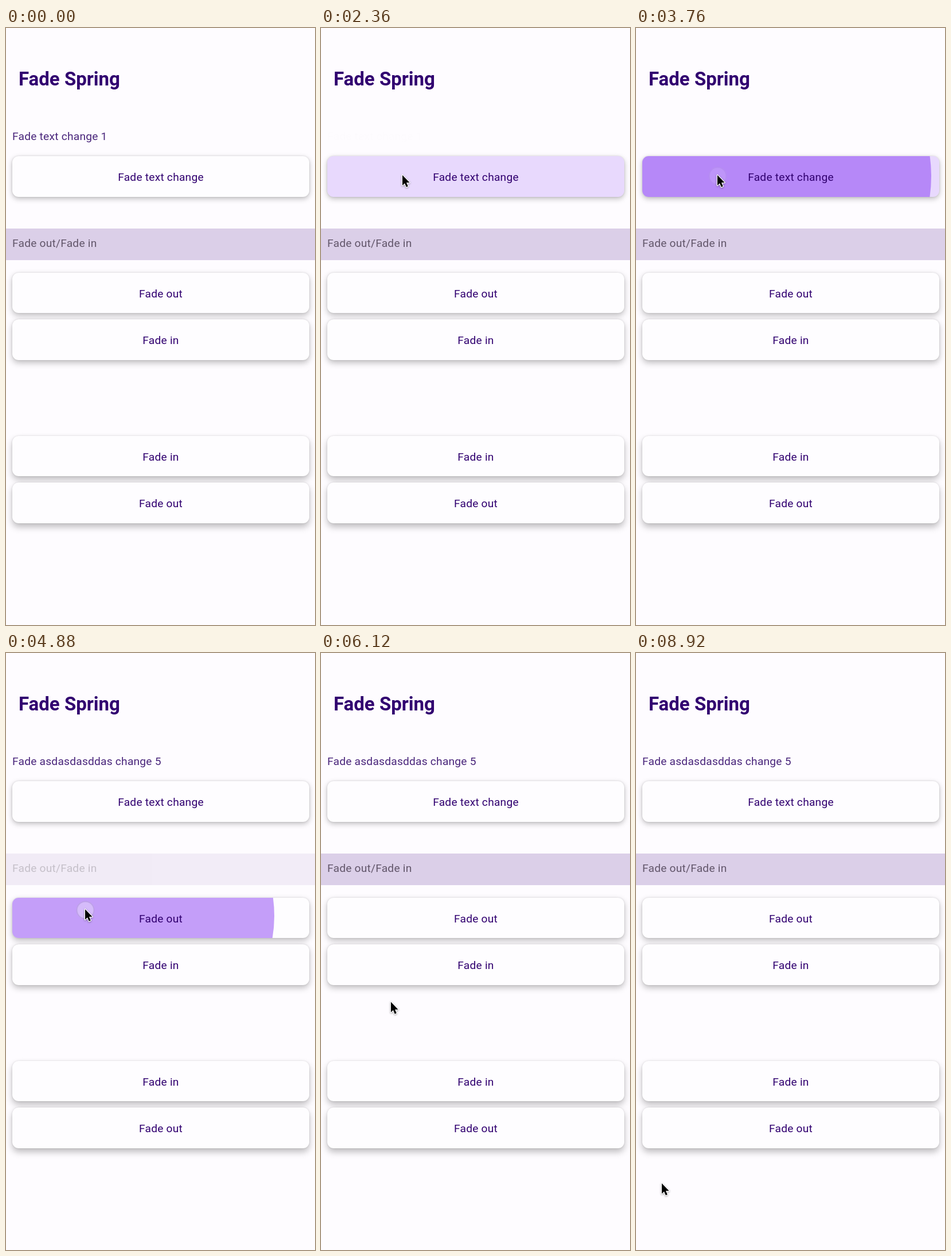
Animation of 539 by 1039 pixels, one loop 8.96 s. Source, as an HTML page:

```html
<!DOCTYPE html>
<html lang="en">
<head>
<meta charset="utf-8">
<title>Fade Spring</title>
<style>
  html, body { margin: 0; width: 100%; height: 100%; overflow: hidden; background: #fefcff; }
  body { position: relative; font: 19.2px Roboto, sans-serif; letter-spacing: .22px; white-space: nowrap; }
  body * { position: absolute; box-sizing: border-box; }
  h1 { left: 22px; top: 68px; margin: 0; font-size: 33px; line-height: 41px; font-weight: 700; letter-spacing: 0; color: #310070; }
  #label { left: 11px; top: 175px; line-height: 28px; color: #49257b; }
  .band { left: 0; width: 539px; height: 55px; padding-left: 11px; line-height: 51px; background: #dbcfe8; color: #62566a; }
  .button { left: 11px; width: 518px; height: 70.5px; border-radius: 11px; background: #fefdff; }
  .clip { inset: 0; overflow: hidden; border-radius: inherit; }
  .button span { inset: 0; line-height: 73px; text-align: center; color: #310070; }
  .ripple { border-radius: 50%; background: #6200ee; }
  #touch { width: 32px; height: 32px; border-radius: 50%; border: 2px solid rgba(110, 85, 165, .32); background: rgba(255, 255, 255, .45); }
  #cursor { left: 0; top: 0; overflow: visible; filter: drop-shadow(0 1.5px 1.5px rgba(0, 0, 0, .35)); }
</style>
</head>
<body>
<h1>Fade Spring</h1>
<div id="label"></div>
<div class="band" style="top:348.5px">Fade out/Fade in</div>
<div class="band" style="top:632.5px">Fade in/Fade out</div>
<div id="touch"></div>
<svg id="cursor" width="16" height="24">
  <path d="M0 0V18l4-3.8 2.8 6.6 3-1.3-2.8-6.4h5.6Z" stroke="#fff" stroke-width="2.4" paint-order="stroke" stroke-linejoin="round"/>
</svg>
<script>
const LOOP = 8960, STEP = 40;
const WIDTH = 518, HEIGHT = 70.5;
const START_RADIUS = WIDTH * 0.3, END_RADIUS = Math.hypot(WIDTH, HEIGHT) / 2;

const buttons = [
  ['Fade text change', 223], ['Fade out', 425.5], ['Fade in', 507],
  ['Fade in', 709.5], ['Fade out', 791],
];
// Time of the ripple start, button index
const presses = [[2042, 0], [2760, 0], [3442, 0], [3609, 0], [4779, 1], [5600, 2], [6600, 3], [7303, 4]];
// Time, x, y of the pointer tip
const pointer = [
  [40, 326, 810], [940, 165, 326], [1400, 142, 256], [4240, 142, 256], [4600, 138, 446],
  [5120, 138, 446], [5500, 130, 526], [5920, 130, 526], [6380, 110, 728],
  [6820, 110, 728], [7160, 83, 820], [7540, 83, 820], [7960, 45, 923],
];

const $ = id => document.getElementById(id);
const [outBand, inBand] = document.querySelectorAll('.band');
const clamp = v => Math.min(1, Math.max(0, v));
const mix = (a, b, p) => a + (b - a) * p;
const smooth = p => p * p * (3 - 2 * p);

// Critically damped spring from 0 to 1
function spring(ms) {
  const x = Math.max(0, ms) * 0.027;
  return 1 - (1 + x) * Math.exp(-x);
}

// cubic-bezier(.4, 0, .2, 1)
function decelerate(x) {
  let low = 0, high = 1;
  for (let i = 0; i < 18; i++) {
    const s = (low + high) / 2, r = 1 - s;
    if (1.2 * s * r * r + 0.6 * s * s * r + s ** 3 < x) low = s; else high = s;
  }
  return smooth((low + high) / 2);
}

function add(parent, className) {
  const el = document.createElement('div');
  el.className = className;
  parent.append(el);
  return el;
}

const clips = buttons.map(([text, top]) => {
  const button = add(document.body, 'button');
  button.style.top = top + 'px';
  button.style.boxShadow =
    `0 ${2 + top / 180}px ${8 + top / 200}px rgba(0,0,0,.25), 0 0 3px rgba(0,0,0,.12)`;
  const clip = add(button, 'clip');
  const caption = document.createElement('span');
  caption.textContent = text;
  button.append(caption);
  return clip;
});
document.body.append($('touch'), $('cursor'));
const ripples = presses.map(([, index]) => add(clips[index], 'ripple'));

function pointerAt(t) {
  const next = pointer.findIndex(key => key[0] > t);
  if (next < 0) return pointer.at(-1).slice(1);
  if (next === 0) return pointer[0].slice(1);
  const [t0, x0, y0] = pointer[next - 1], [t1, x1, y1] = pointer[next];
  const p = smooth((t - t0) / (t1 - t0));
  return [mix(x0, x1, p), mix(y0, y1, p)];
}

function drawRipple(el, age, index) {
  const p = decelerate(clamp(age / 225));
  const radius = mix(START_RADIUS, END_RADIUS, p);
  const x = mix(WIDTH / 2 - (END_RADIUS - START_RADIUS), WIDTH / 2, p);
  const y = mix(index === 1 ? 24 : 32, HEIGHT / 2, p);
  Object.assign(el.style, {
    left: x - radius + 'px', top: y - radius + 'px',
    width: 2 * radius + 'px', height: 2 * radius + 'px',
    opacity: 0.375 * clamp(age / 75) * clamp((375 - age) / 150),
  });
}

function draw(t) {
  let labelAlpha = 1, count = 1, touchAlpha = 0;
  presses.forEach(([start, index], i) => {
    const age = t - start;
    drawRipple(ripples[i], age, index);
    if (age > -100) touchAlpha = clamp((180 - age) / 120);
    if (index === 0) {
      labelAlpha *= 1 - spring(age - 20) + spring(age - 330);
      if (age > 325) count++;
    }
  });

  $('label').textContent = `Fade ${count === 1 ? 'text' : 'asdasdasddas'} change ${count}`;
  $('label').style.opacity = labelAlpha;
  const fade = i => spring(t - presses[i][0] - 20);
  outBand.style.opacity = 1 - fade(4) + fade(5);
  inBand.style.opacity = fade(6) - fade(7);

  const [x, y] = pointerAt(t);
  $('cursor').style.transform = `translate(${x}px, ${y}px)`;
  $('cursor').style.visibility = t < STEP ? 'hidden' : 'visible';
  $('touch').style.transform = `translate(${x - 15.5}px, ${y - 14.5}px)`;
  $('touch').style.opacity = touchAlpha;
}

const begin = performance.now();
function frame() {
  const t = (performance.now() - begin) % LOOP;
  draw(Math.floor(t / STEP) * STEP);
  requestAnimationFrame(frame);
}
frame();
</script>
</body>
</html>
```
